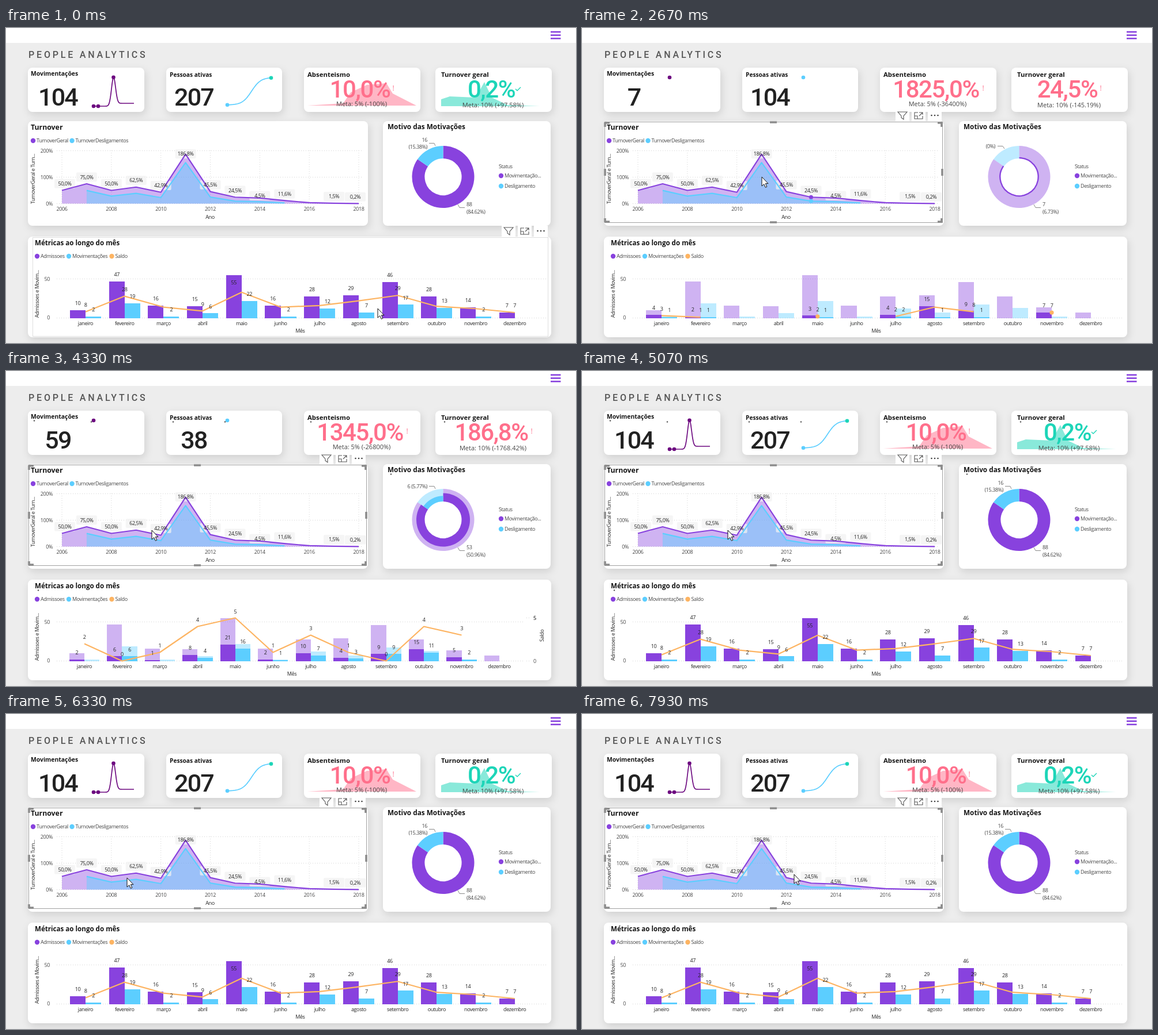
These frames come from a looping animation (989 by 548 pixels, 8 s). An HTML page:

```html
<!DOCTYPE html>
<html lang="pt">
<head>
<meta charset="utf-8">
<title>People Analytics</title>
<style>
  html, body { margin: 0; width: 100%; height: 100%; overflow: hidden; background: #ededed; }
  svg { display: block; width: 100vw; height: 100vh; }
  text { font: 9px "Open Sans", "Noto Sans", sans-serif; letter-spacing: -.4px; fill: #484848; }
  .title { font-weight: 700; letter-spacing: 0; fill: #161616; }
  .dark { fill: #252525; }
  .big { font: 500 43px Roboto, sans-serif; letter-spacing: -1.8px; fill: #222; }
  .kpi { font: 500 42px Roboto, sans-serif; letter-spacing: -1.4px; }
  .meta { font-size: 11px; letter-spacing: 0; fill: #444; }
  .mark { font-size: 12px; }
  .head { font: 500 16px Roboto, sans-serif; letter-spacing: 3.8px; fill: #555; }
  .card { fill: #fff; filter: drop-shadow(2px 5px 7px rgba(0, 0, 0, .12)); }
  .bars { shape-rendering: crispEdges; }
  .grid { stroke: #d2d2d2; stroke-dasharray: 1 3; fill: none; }
  .thin { stroke: #8a8a8a; fill: none; }
</style>
</head>
<body>
<svg viewBox="0 0 989 548">
  <defs><clipPath id="plot"><rect x="80" y="413" width="830" height="95"/></clipPath></defs>
  <g id="base"></g>
  <g id="live"></g>
  <path id="cursor" d="M0 0V16L3.8 12.6 6.3 18.3 8.8 17.2 6.4 11.6H11Z" fill="#fff" stroke="#111"/>
</svg>
<script>
const LOOP = 8000, LOAD = 120, TWEEN = 200, TRAVEL = 330;
const PURPLE = '#8842de', BLUE = '#5cceff', ORANGE = '#fdb462';
const PLUM = '#6d0a80', TEAL = '#1dd5b8', PINK = '#ff6f8b';
const months = 'janeiro fevereiro março abril maio junho julho agosto setembro outubro novembro dezembro'.split(' ');
const $ = id => document.getElementById(id);
const lerp = (a, b, k) => a + (b - a) * k;
const sigmoid = x => 1 / (1 + Math.exp(-x));

// SVG string helpers; text is placed by its vertical centre
const text = (x, y, s, { cls = '', size = 9, anchor = 'middle', style = '' } = {}) =>
  `<text x="${x}" y="${y + size * .36}" class="${cls}" text-anchor="${anchor}" style="${style}">${s}</text>`;
const left = (x, y, s) => text(x, y, s, { anchor: 'start' });
const right = (x, y, s) => text(x, y, s, { anchor: 'end' });
const dark = (x, y, s) => text(x, y, s, { cls: 'dark' });
const title = (x, y, s, size) => text(x, y, s, { cls: 'title', size, anchor: 'start', style: `font-size:${size}px` });
const upright = (x, y, s) => `<text class="dark" transform="translate(${x} ${y}) rotate(-90)">${s}</text>`;
const rect = (x, y, w, h, fill, extra = '') =>
  `<rect x="${x}" y="${y}" width="${w}" height="${h}" fill="${fill}" ${extra}/>`;
const dot = (x, y, r, fill) => `<circle cx="${x}" cy="${y}" r="${r}" fill="${fill}"/>`;
const line = (d, color, w = 2.2) =>
  `<path d="${d}" fill="none" stroke="${color}" stroke-width="${w}" stroke-linejoin="round"/>`;
const area = (d, color, o = .4) => `<path d="${d}" fill="${color}" fill-opacity="${o}"/>`;
const grid = d => `<path class="grid" d="${d}"/>`;
const thin = d => `<path class="thin" d="${d}"/>`;
const card = (x, y, w, h) => `<rect class="card" x="${x}" y="${y}" width="${w}" height="${h}" rx="8"/>`;
const legend = (x, y, color, s) => dot(x, y, 4.2, color) + left(x + 6, y, s);

// Sparkline of y = f(x), with dots at the given x
function spark(x0, x1, f, color, dots, lastColor = color) {
  let d = '';
  for (let x = x0; x <= x1; x++) d += `${d ? 'L' : 'M'}${x} ${f(x)}`;
  return line(d, color, 1.7) + dots.map((x, i) => dot(x, f(x), 3.3, i === dots.length - 1 ? lastColor : color)).join('');
}
const spike = x => 136 - 5 * sigmoid((x - 187) / 2) - 48 * Math.exp(-(((x - 186.5) / 5) ** 2));
const fall = x => x > 198 ? 136 : 111 - 25 * Math.cos((x - 152) / 46 * Math.PI);
const growth = x => 134 - 48 * sigmoid((x - 426) / 8);
const climb = x => 133 - 47 * ((x - 384) / 76) ** 1.6;

// [Admissoes, Movimentações] per month; Saldo is their difference
const byMonth = data => months.map(name => data[name.slice(0, 3)] ?? [0, 0]);
const wide = { x0: 138, step: 67.7, unit: 1.354, ticks: [] };
const axis = (max, step, digits = 0) => [0, step, max].map(v => [v, v.toFixed(digits)]);
const single = { spark: dot(152, 86, 3.3, PLUM) + dot(384, 86, 3.3, BLUE), areas: '', fade: .4 };
const narrow = { ...single, x0: 136, step: 65.45 };

const all = {
  ...wide, fade: 1, quiet: 'mar mai jun jul ago out nov',
  data: byMonth({
    jan: [10, 2], fev: [47, 19], mar: [16, 2], abr: [15, 6], mai: [55, 22], jun: [16, 2],
    jul: [28, 12], ago: [29, 7], set: [46, 17], out: [28, 13], nov: [14, 2], dez: [7, 0],
  }),
  cards: ['104', '207', '10,0%', '0,2%'], metas: ['5% (-100%)', '10% (+97.58%)'],
  ring: [88, 16], top: ['16', '(15.38%)'], bottom: '(84.62%)',
  spark: spark(152, 222, spike, PLUM, [152, 160, 186.5]) + spark(384, 460, growth, BLUE, [384, 460], TEAL),
  areas: area('M523 135L585 131 598 112 626 99 660 96 671 114 712 135Z', PINK, .5)
    + area('M755 136V124L770 119 815 121 830 94 843 121 870 134 926 136Z', TEAL, .52),
};
const september = {
  ...all, fade: .4, only: 8, cards: ['17', ...all.cards.slice(1)],
  ring: [15, 2], top: ['2 (1.92%)'], bottom: '(14.42%)',
  spark: spark(152, 221, fall, PLUM, [152, 198, 221]) + spark(384, 460, climb, BLUE, [384, 460], TEAL),
  areas: area('M523 135V132L540 135ZM600 135L625 97H655L663 135ZM696 135L712 133V135Z', PINK, .5)
    + area('M755 136V91L770 136ZM815 136L829 111 858 128 885 133 930 136Z', TEAL, .52),
};
const y2013 = {
  ...single, ...wide, year: 2013, quiet: 'ago',
  data: byMonth({ jan: [4, 1], fev: [2, 1], mai: [3, 1], jul: [4, 2], ago: [15, 1], set: [9, 1], nov: [7, 0] }),
  cards: ['7', '104', '1825,0%', '24,5%'], metas: ['5% (-36400%)', '10% (-145.19%)'],
  ring: [7, 0], top: ['(0%)'], bottom: '(6.73%)',
};
const y2011 = {
  ...narrow, year: 2011, unit: 15, ticks: axis(5, 5),
  data: byMonth({
    jan: [2, 0], fev: [6, 6], mar: [1, 0], abr: [8, 4], mai: [21, 16], jun: [2, 1],
    jul: [10, 7], ago: [4, 3], set: [9, 9], out: [15, 11], nov: [5, 2],
  }),
  cards: ['59', '38', '1345,0%', '186,8%'], metas: ['5% (-26800%)', '10% (-1768.42%)'],
  ring: [53, 6], top: ['6 (5.77%)'], bottom: '(50.96%)',
};
const one = [1, 0], pair = [2, 1];
const y2010 = {
  ...narrow, year: 2010, unit: 45.4, ticks: axis(2, 1),
  data: byMonth({ jan: one, abr: pair, jul: one, ago: pair, set: one, out: pair }),
  cards: ['3', '14', '285,0%', '42,9%'], metas: ['5% (-5600%)', '10% (-328.57%)'],
  ring: [3, 0], top: ['(0%)'], bottom: '(2.88%)',
};
const y2008 = {
  ...single, x0: 135.5, step: 64.9, year: 2008, unit: 91, ticks: axis(1, .5, 1),
  data: byMonth({ fev: [1, 1], jul: one, out: one }),
  cards: ['1', '4', '145,0%', '50,0%'], metas: ['5% (-2800%)', '10% (-400%)'],
  ring: [1, 0], top: ['(0%)'], bottom: '(0.96%)',
};

// Click time and the view it loads
const clicks = [[-LOOP, all], [730, september], [2130, y2013], [3270, y2011], [4330, all],
  [5070, y2010], [5730, all], [6600, y2008], [7600, all]];
// Arrival time and place of each pointer move
const moves = [[0, 645, 488], [470, 663, 487], [1270, 454, 345], [1530, 393, 213], [1730, 396, 310],
  [2670, 312, 259], [3930, 253, 277], [5470, 210, 285], [6930, 223, 295], [7930, 368, 279]];

const yearly = [50, 75, 50, 62.5, 42.9, 186.8, 45.5, 24.5, 21, 11.6, 3.5, 1.5, .2].map((v, i) => [2006 + i, v]);
const inSeptember = Object.entries({ 2006: 50, 2010: 3.8, 2011: 29, 2012: 13.4, 2013: 5.2, 2014: 4.9, 2018: .2 })
  .map(([y, v]) => [+y + .66, v]);
const fullChart = {
  x0: 97, year0: 2006, perYear: 42.92, unit: .46, ticks: [0, 100, 200], geral: yearly,
  deslig: yearly.slice(1, 10).map(([y, v]) => [y, v * v / (v + 38)]),
  labels: [...yearly.filter(([y]) => y !== 2014 && y !== 2016), [2014, 4.5]],
};
const septemberChart = {
  x0: 150, year0: 2008, perYear: 43.3, unit: 1.53, ticks: [0, 50], geral: inSeptember, labels: inSeptember,
  deslig: inSeptember.slice(2, 6).map(([y], i) => [y, 29 * .3 ** i]),
};

function turnover(c, year) {
  const X = y => c.x0 + (y - c.year0) * c.perYear, Y = v => 305.5 - v * c.unit;
  const poly = pts => 'M' + pts.map(([y, v]) => `${X(y)} ${Y(v)}`).join('L');
  const closed = pts => `${poly(pts)}V305.5H${X(pts[0][0])}Z`;
  let out = '', names = '';
  for (const v of c.ticks) {
    out += grid(`M88 ${Y(v)}H617`);
    names += right(81, Y(v), v + '%');
  }
  for (let y = c.year0; y <= 2018; y += 2) {
    out += grid(`M${X(y)} 213V305`);
    names += text(X(y), 315, y);
  }
  out += area(closed(c.geral), PURPLE) + area(closed(c.deslig), BLUE, .45);
  for (const [y, v] of c.labels) {
    const x = Math.min(606, Math.max(102, X(y))), ly = Math.max(219, Y(v) - 11.7);
    out += rect(x - 18, ly - 8, 36, 16, '#f2f2f2', 'rx="2" opacity=".75"');
    names += dark(x, ly, v.toFixed(1).replace('.', ',') + '%');
  }
  for (const [pts, color] of [[c.geral, PURPLE], [c.deslig, BLUE]]) {
    out += line(poly(pts), color);
    for (const [y, v] of pts) if (y === year) out += dot(X(y), Y(v), 3.6, color);
  }
  return out + names;
}

function arc(r0, r1, a, b, color, o) {
  const r = (r0 + r1) / 2;
  const at = f => `${758.5 + r * Math.sin(f * 2 * Math.PI)} ${259 - r * Math.cos(f * 2 * Math.PI)}`;
  return `<path d="M${at(a)}A${r} ${r} 0 ${+(b - a > .5)} 1 ${at(b)}" fill="none" stroke="${color}" stroke-width="${r1 - r0}" stroke-opacity="${o}"/>`;
}

// Highlights fill each sector from the inside, in proportion to area
function donut(s, fade, ring) {
  const split = 88 / 104, inner = 32, outer = 54;
  const sectors = [[0, split, PURPLE, ring[0] / 88], [split, 1, BLUE, ring[1] / 16]];
  let out = '';
  for (const [a, b, color, share] of sectors) {
    out += arc(inner, outer, a, b, color, fade);
    if (fade < 1) out += arc(inner, Math.sqrt(lerp(inner ** 2, outer ** 2, share)), a, b, color, 1);
  }
  const none = !s.ring[1];
  s.top.forEach((t, i) => out += right(none ? 717 : 731, (s.top[1] ? 195 : none ? 206 : 201) + 12 * i, t));
  out += left(799, 307, s.ring[0]) + left(799, 319.5, s.bottom);
  return out + thin(none ? 'M721 205.5H730L733 210' : 'M734 200.5H743L745 205') + thin('M784 307L787 312.5H796');
}

function combo(s, m) {
  const X = i => m.x0 + m.step * i, Y = v => 504.5 - v * 1.354, w = m.step * .4;
  const dual = s.ticks.length > 0, end = X(11) + (dual ? 41 : 55);
  const bar = (x, v, color, o) => v > 0 ? rect(x, Y(v), w, v * 1.354, color, `opacity="${o}"`) : '';
  let bars = '', labels = '', dots = '', path = '';
  months.forEach((name, i) => {
    const x = X(i), y = 504.5 - m.saldo[i], [adm, mov] = s.data[i];
    [PURPLE, BLUE].forEach((color, j) => {
      bars += bar(x - w + j * w, all.data[i][j], color, m.fade);
      if (m.fade < 1) bars += bar(x - w + j * w, m.data[i][j], color, 1);
    });
    if (adm) {
      const starts = !s.data[i - 1]?.[0], ends = !s.data[i + 1]?.[0];
      path += `${starts ? 'M' : 'L'}${x} ${y}`;
      if (starts && ends || s.only === i) dots += dot(x, y, 3.6, ORANGE);
      labels += dark(x - w / 2, Y(adm) + (adm > 50 ? 13 : -12), adm);
      if (!s.quiet?.includes(name.slice(0, 3))) labels += dark(x, Math.max(419, y - 12), adm - mov);
    }
    if (mov) labels += dark(x + w / 2, Y(mov) - 12, mov);
    labels += dark(x, 514, name);
  });
  for (const [v, name] of s.ticks) {
    const y = 504.5 - v * s.unit;
    labels += grid(`M${end + 6} ${y}H${end + 13}`) + left(end + 18, y, name);
  }
  if (dual) labels += upright(933, 471, 'Saldo');
  return grid(`M88 436.5H${end}M88 504.5H${end}`) + `<g class="bars">${bars}</g>`
    + `<g clip-path="url(#plot)">${line(path, ORANGE)}${dots}</g>` + labels + dark(X(5.5), 527, 'Mês');
}

function cards(s) {
  let out = s.areas + s.spark;
  s.cards.forEach((v, i) => {
    if (i < 2) { out += text(90 + 236 * i, 119.5, v, { cls: 'big', size: 43 }); return; }
    const x = 614 + 228 * (i - 2), good = v === '0,2%', color = good ? TEAL : PINK, end = x + 12 * v.length - 2;
    out += text(x, 106, v, { cls: 'kpi', size: 42, style: `fill:${color}` });
    out += good ? line(`M${end - 4} 106L${end - 1} 109 ${end + 5} 103`, color, 1.4)
      : text(end, 105, '!', { cls: 'mark', size: 12, style: `fill:${color}` });
    out += text(x + 3, 132.5 + 2 * (i - 2), 'Meta: ' + s.metas[i - 2], { cls: 'meta', size: 11 });
  });
  return out;
}

function toolbar(x, y) {
  return [0, 28, 56].map(d => rect(x + d, y - 9, 24, 19, '#fff')).join('')
    + `<g transform="translate(${x} ${y})" stroke="#555" fill="none" stroke-width="1.1"><path d="M4 -6h16l-6 7v6l-4-3v-3z"/>`
    + '<path d="M39 -5h-6v11h14v-5M41 -5h6v4M47 -5l-6 6M33 1h5v5"/></g>'
    + [-5.5, 0, 5.5].map(d => dot(x + 68 + d, y, 1.3, '#444')).join('');
}

const selection = toolbar(544, 152) + rect(39.5, 163.5, 586, 175, 'none', 'stroke="#a0a0a0"')
  + line('M40 172V165H48M617 165H624V172M40 331V337H48M617 337H624V331M326 164H338M326 338H338M40 245V257M625 245V257', '#8c8c8c', 3.6);
const hover = rect(46.5, 364.5, 894, 172, 'none', 'stroke="#dedede"') + toolbar(860, 353);

const titles = [[43, 79, 'Movimentações', 10.4], [284, 81, 'Pessoas ativas', 10.2], [523, 81, 'Absenteismo', 11.4],
  [755, 81, 'Turnover geral', 11.4], [662, 172, 'Motivo das Motivações', 11.8], [50, 374, 'Métricas ao longo do mês', 11.6]];
const loadingDots = titles.map(([x, y]) => dot(x + 6, y + 7.5, 1.2, '#555')).join('')
  + dot(148, 88.5, 1.2, '#555') + dot(380, 88.5, 1.2, '#555');

$('base').innerHTML = rect(0, 0, 989, 548, '#ededed') + rect(0, 0, 989, 26, '#fff')
  + [0, 1, 2].map(i => rect(945, 5.5 + 5.7 * i, 17.5, 2.6, PURPLE)).join('')
  + text(39, 46.5, 'PEOPLE ANALYTICS', { cls: 'head', size: 16, anchor: 'start' })
  + card(38, 69, 202, 77) + card(278, 69, 201, 77) + card(517, 69, 202, 77) + card(745, 69, 202, 77)
  + card(38, 162, 590, 182) + card(654, 162, 291, 182) + card(38, 363, 908, 175)
  + title(43, 173, 'Turnover', 12.3)
  + legend(47, 196, PURPLE, 'TurnoverGeral') + legend(114.5, 196, BLUE, 'TurnoverDesligamentos')
  + legend(54, 397, PURPLE, 'Admissoes') + legend(109, 397, BLUE, 'Movimentações') + legend(183.5, 397, ORANGE, 'Saldo')
  + left(855, 241, 'Status') + legend(859, 257, PURPLE, 'Movimentação...') + legend(859, 275, BLUE, 'Desligamento')
  + upright(50, 306, 'TurnoverGeral e Turn...') + upright(57, 504, 'Admissoes e Movim...')
  + dark(354, 329, 'Ano') + right(76, 437, '50') + right(76, 504, '0');

// The animated values of a view: highlighted bars, saldo in pixels, layout
const drawn = s => ({
  x0: s.x0, step: s.step, fade: s.fade, ring: s.ring,
  data: s.data.map((pair, i) => [undefined, i].includes(s.only) ? pair : [0, 0]),
  saldo: s.data.map(([adm, mov]) => (adm - mov) * s.unit),
});
function mix(a, b, k) {
  if (typeof b === 'number') return lerp(a, b, k);
  const out = Array.isArray(b) ? [] : {};
  for (const key in b) out[key] = mix(a[key], b[key], k);
  return out;
}

function render(t) {
  const n = clicks.findLastIndex(([at]) => at + LOAD <= t);
  const [at, s] = clicks[n], previous = clicks[Math.max(0, n - 1)][1];
  const p = Math.min(1, (t - at - LOAD) / TWEEN);
  const m = mix(drawn(previous), drawn(s), 1 - (1 - p) ** 3);
  const loading = clicks[n + 1]?.[0] <= t;
  $('live').innerHTML = cards(s) + titles.map(args => title(...args)).join('')
    + turnover(s === september ? septemberChart : fullChart, loading ? 0 : s.year)
    + donut(s, m.fade, m.ring) + combo(s, m)
    + (t < clicks[2][0] ? hover : selection) + (loading ? loadingDots : '');

  const j = Math.max(1, moves.findIndex(([end]) => end > t));
  const [t0, x0, y0] = moves[j - 1], [t1, x1, y1] = t < moves.at(-1)[0] ? moves[j] : moves.at(-1);
  const k = Math.min(1, Math.max(0, 1 - (t1 - t) / Math.min(TRAVEL, t1 - t0)));
  $('cursor').setAttribute('transform', `translate(${lerp(x0, x1, k)} ${lerp(y0, y1, k)})`);
}

const start = performance.now();
function frame() {
  render((performance.now() - start) % LOOP);
  requestAnimationFrame(frame);
}
frame();
</script>
</body>
</html>
```
